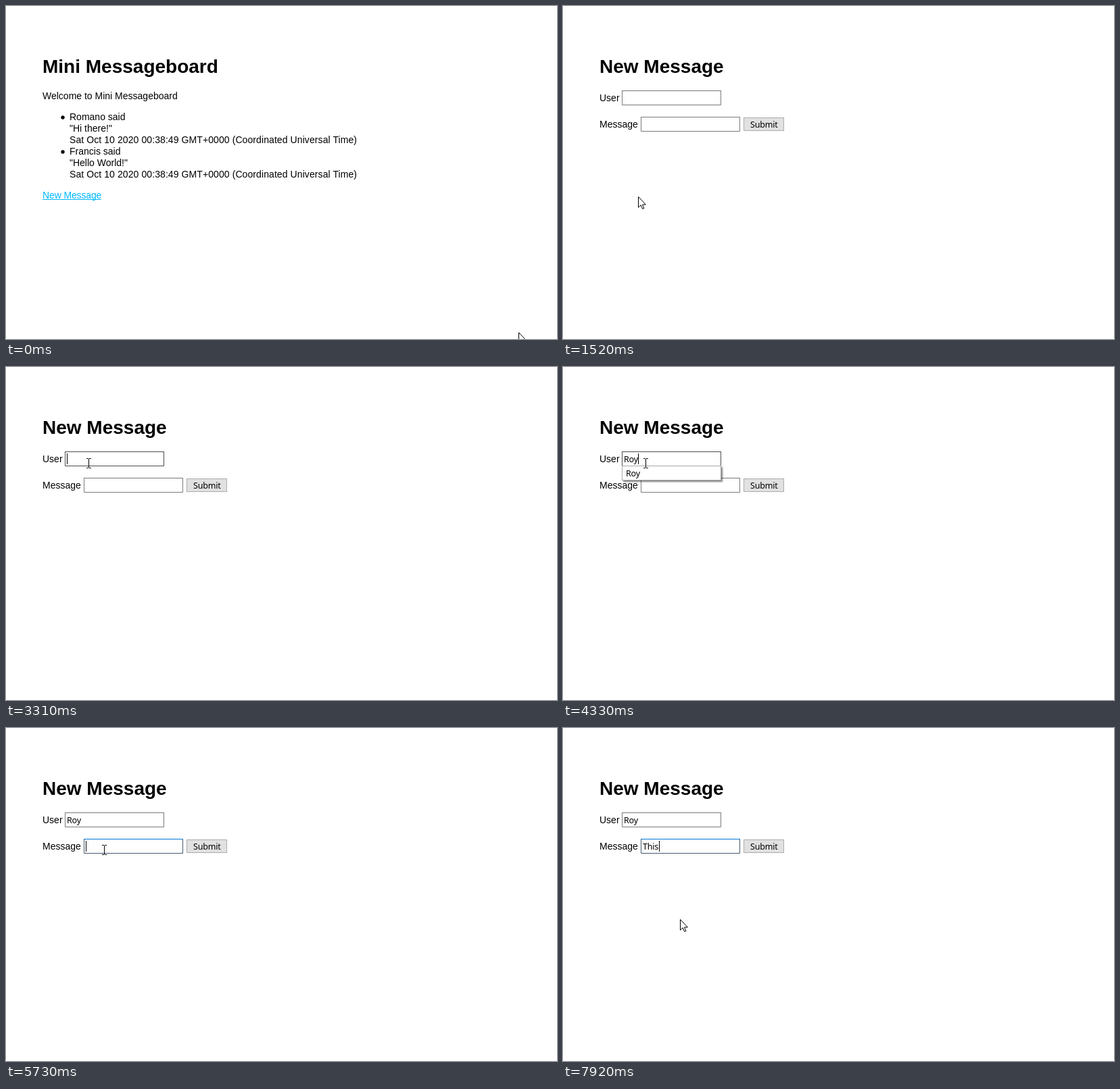
An HTML page that plays this animation: 815x493 px, repeating every 8000 ms.

```html
<!DOCTYPE html>
<html lang="en">
<head>
<meta charset="utf-8">
<title>Mini Messageboard</title>
<style>
  html, body { margin: 0; width: 100%; height: 100%; overflow: hidden; background: #fff; }
  svg { display: block; width: 815px; height: 493px; }
  text { font: 14px "Liberation Sans", Arial, sans-serif; white-space: pre; }
  .title { font-weight: bold; font-size: 28px; }
  .date { letter-spacing: .085px; }
  .link { fill: #00b7ff; letter-spacing: -.13px; }
  .ui { font: 12.5px "Noto Sans", "Open Sans", sans-serif; letter-spacing: -.2px; }
  .field { fill: #fff; stroke: none; }
  .edge { fill: none; stroke-width: 1; }
  .popup { filter: drop-shadow(2px 2px 1px rgba(0, 0, 0, .5)); }
  .box { fill: #fff; stroke: #a8a8a8; }
  .cursor path { fill: #fff; stroke: #000; stroke-linejoin: round; }
</style>
</head>
<body>
<svg viewBox="0 0 815 493">
  <g id="board">
    <text class="title" x="54" y="99">Mini Messageboard</text>
    <text x="54" y="138">Welcome to Mini Messageboard</text>
    <circle cx="84" cy="165" r="2.7"/>
    <text x="94" y="169">Romano said</text>
    <text x="94" y="186">"Hi there!"</text>
    <text class="date" x="94" y="203">Sat Oct 10 2020 00:38:49 GMT+0000 (Coordinated Universal Time)</text>
    <circle cx="84" cy="216" r="2.7"/>
    <text x="94" y="220">Francis said</text>
    <text x="94" y="237">"Hello World!"</text>
    <text class="date" x="94" y="254">Sat Oct 10 2020 00:38:49 GMT+0000 (Coordinated Universal Time)</text>
    <text class="link" x="54" y="285">New Message</text>
    <path d="M54 286.5H141" stroke="#00b7ff"/>
    <rect id="outline" x="53.5" y="271.5" width="88" height="17" fill="none" stroke="#00b7ff" stroke-dasharray="1"/>
  </g>

  <g id="form">
    <text class="title" x="54" y="99">New Message</text>
    <text x="54" y="141">User</text>
    <text x="54" y="180">Message</text>
    <rect class="field" x="87" y="125" width="147" height="22"/>
    <path class="edge" id="userEdge" d="M87.5 125V146.5H233.5V125"/>
    <path class="edge" id="userTop" d="M87 125.5H234"/>
    <rect class="field" x="115" y="164" width="147" height="22"/>
    <path class="edge" id="msgEdge" d="M115.5 164V185.5H261.5V164"/>
    <path class="edge" id="msgTop" d="M115 164.5H262"/>
    <rect x="267.5" y="165.5" width="59" height="19" fill="#e1e1e1" stroke="#adadad"/>
    <text class="ui" x="277" y="180">Submit</text>
    <text class="ui" id="user" x="90" y="141"></text>
    <text class="ui" id="msg" x="118" y="180"></text>
    <g class="popup" id="userList">
      <rect class="box" x="87.5" y="146.5" width="146" height="21"/>
      <rect id="row" x="89" y="148" width="143" height="18" fill="#e5e5e5"/>
      <text class="ui" x="93" y="162">Roy</text>
    </g>
    <g class="popup" id="msgList">
      <rect class="box" x="115.5" y="185.5" width="146" height="21"/>
      <text class="ui" x="121" y="201">Test</text>
    </g>
    <rect id="caret" width="1" height="16"/>
  </g>

  <circle id="click" r="12" fill="#ff0" fill-opacity=".6"/>
  <g class="cursor" id="cursor">
    <path id="arrow" d="M.5 .5V16.2L4.2 12.8 6.7 18.4 8.9 17.4 6.5 12H11.4Z"/>
    <g id="hand">
      <path d="M-1.5 14V2a1.75 1.75 0 0 1 3.5 0v6c0-2 3.5-2 3.5 .5c0-1.8 3.3-1.6 3.3 .7c0-1.5 3-1.3 3 1V16C11.8 20 9.5 23.3 5.5 23.3H3C0 23.3-1.2 21-2.5 19L-5.4 14.3C-6.2 12.3-3.8 11.3-2.8 12.6Z"/>
      <path d="M2 8v5M5.5 9v4M8.8 10v3.5" style="fill:none"/>
    </g>
    <path id="beam" d="M-1-6.5h3M3-6.5h3M2.5-6V7M-1 7.5h3M3 7.5h3" style="fill:none"/>
  </g>
</svg>
<script>
const LOOP = 8000;
const el = {};
document.querySelectorAll('[id]').forEach(e => el[e.id] = e);

// Pointer moves: first step, last step, step count, end point
const moves = [
  [80, 160, 2, 465, 343],
  [480, 880, 6, 109, 284],
  [960, 1040, 2, 111, 282],
  [1670, 2060, 6, 120, 142],
  [4410, 4490, 2, 120, 157],
  [4870, 5030, 3, 118, 189],
  [5110, 5110, 1, 118, 192],
  [5190, 5490, 5, 141, 178],
  [5730, 5730, 1, 143, 180],
  [5810, 6190, 6, 173, 283]
];
const userText = [[0, ''], [3390, 'R'], [3550, 'Ro'], [3630, 'Roy']];
const msgText = [[0, ''], [6830, 'T'], [6990, 'Th'], [7860, 'Thi'], [7920, 'This']];
// Caret x over time, 0 when hidden
const carets = [
  [0, 0], [2450, 90], [2770, 0], [3310, 90], [3390, 97], [3550, 104], [3630, 111],
  [3790, 0], [4330, 111], [4870, 0], [5490, 118], [6040, 0], [6590, 118],
  [6830, 125], [6990, 133], [7620, 0], [7860, 136], [7920, 142]
];

const during = (t, a, b) => t >= a && t < b;
const inside = (p, x0, y0, x1, y1) => p.x >= x0 && p.x < x1 && p.y >= y0 && p.y < y1;
const show = (e, on) => e.style.display = on ? '' : 'none';
const ease = u => u * u * (3 - 2 * u);

function at(track, t) {
  let value;
  for (const [time, v] of track) if (t >= time) value = v;
  return value;
}

function pointer(t) {
  let x = 758, y = 483;
  for (const [start, end, n, toX, toY] of moves) {
    if (t < start) break;
    const gap = n > 1 ? (end - start) / (n - 1) : 1;
    const step = Math.min(n, Math.floor((t - start) / gap + .01) + 1);
    const k = ease(step / n);
    x += (toX - x) * k;
    y += (toY - y) * k;
  }
  return { x: Math.round(x), y: Math.round(y) };
}

function border(name, edge, top) {
  el[name + 'Edge'].setAttribute('stroke', edge);
  el[name + 'Top'].setAttribute('stroke', top);
}

function draw(t) {
  const p = pointer(t);
  const form = t >= 1440;
  const onUser = form && inside(p, 87, 125, 234, 147);
  const onMsg = form && inside(p, 115, 164, 262, 186);
  const onLink = t < 1520 && inside(p, 54, 271, 142, 289);
  const plain = '#7a7a7a', hover = '#171717', blue = '#0078d7';

  show(el.board, !form);
  show(el.form, form);
  show(el.outline, t >= 1200);

  if (during(t, 2450, 4870)) border('user', '#4c4c4c', '#4c4c4c');
  else if (during(t, 4870, 5490)) border('user', blue, '#5f6b76');
  else border('user', onUser ? hover : plain, onUser ? hover : plain);
  if (t >= 5490) border('msg', '#44586c', blue);
  else border('msg', onMsg ? hover : plain, onMsg ? hover : plain);

  el.user.textContent = at(userText, t);
  el.msg.textContent = at(msgText, t);
  show(el.userList, during(t, 3390, 4630));
  show(el.row, t >= 4410);
  show(el.msgList, during(t, 6910, 7070));

  const caret = at(carets, t);
  show(el.caret, caret);
  el.caret.setAttribute('x', caret);
  el.caret.setAttribute('y', t < 5000 ? 128 : 167);

  const pressed = during(t, 1200, 1440) || during(t, 2220, 2300) || during(t, 5490, 5570);
  show(el.click, pressed);
  el.click.setAttribute('cx', p.x);
  el.click.setAttribute('cy', p.y);

  el.cursor.setAttribute('transform', `translate(${p.x} ${p.y})`);
  show(el.hand, onLink);
  show(el.beam, onUser || onMsg);
  show(el.arrow, !onLink && !onUser && !onMsg);
}

const begin = performance.now();
function tick() {
  draw((performance.now() - begin) % LOOP);
  requestAnimationFrame(tick);
}
tick();
</script>
</body>
</html>
```
